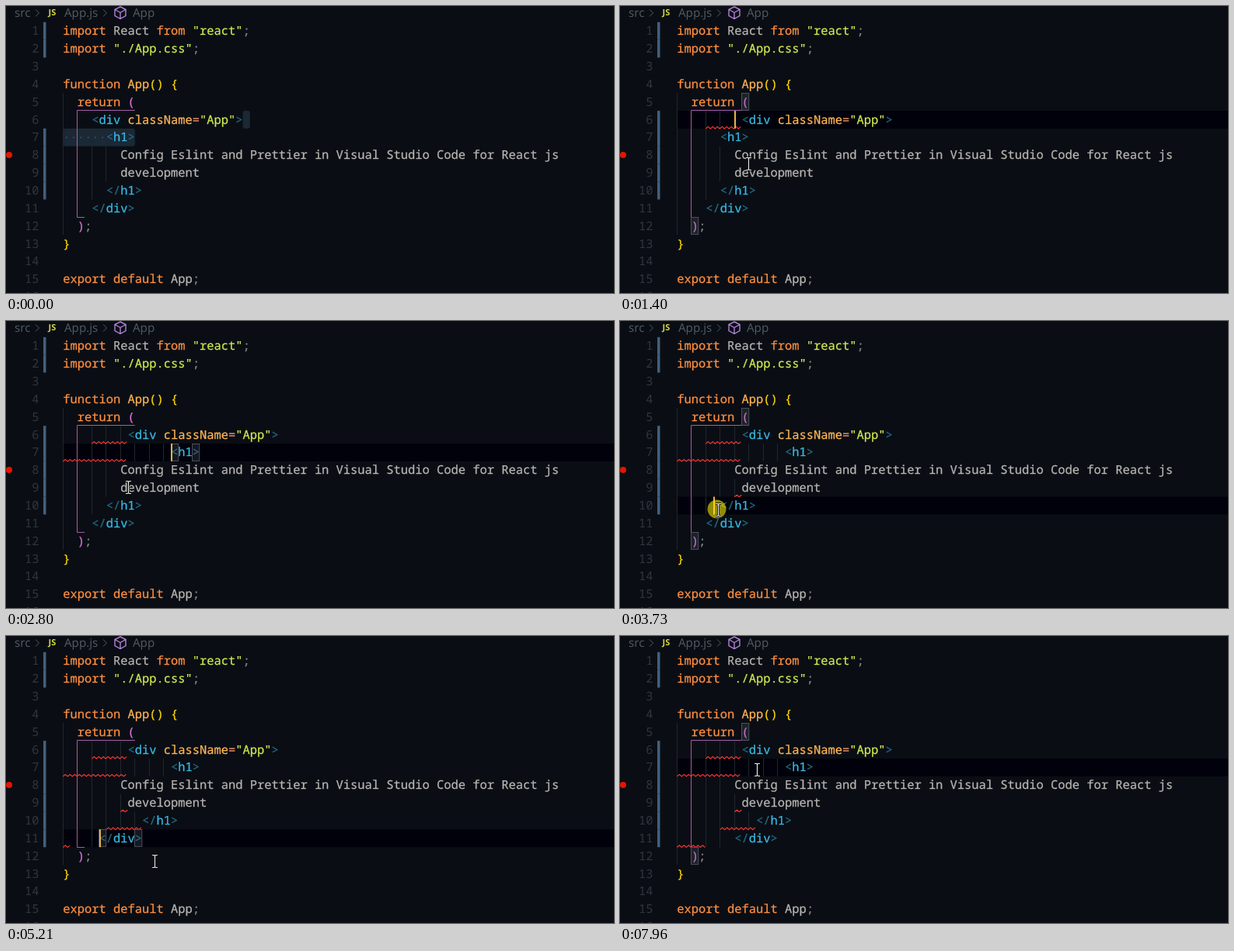
These frames come from a looping animation (782x370 px, 8000 ms). An HTML page:

```html
<!DOCTYPE html>
<html lang="en">
<head>
<meta charset="utf-8">
<title>Editor indentation</title>
<style>
html, body { margin: 0; width: 100%; height: 100%; overflow: hidden; background: #0a0e14; }
svg { display: block; width: 782px; height: 370px; }
text { white-space: pre; text-rendering: geometricPrecision; fill: currentColor; }
.code { font: 15.42px "Noto Sans Mono", monospace; color: #b8b6b2; }
.code tspan { fill: currentColor; stroke: currentColor; stroke-width: .25; }
.num { font: 15.42px "Noto Sans Mono", monospace; color: #2f363e; text-anchor: end; }
.crumb { font: 15.2px "Open Sans", sans-serif; color: #535b63; }
.js { font: bold 11px "Open Sans", sans-serif; color: #d3d345; }
.k { color: #ff8f40; }
.s { color: #d0ea50; }
.n { color: #ffb454; }
.t { color: #39bae6; }
.b { color: #246a85; }
.o { color: #f29668; }
.d { color: #858482; }
.y { color: #ffd700; }
.m { color: #da70d6; }
.line { fill: none; stroke-width: 1; }
</style>
</head>
<body>
<svg viewBox="0 0 782 370">
  <g id="back"></g>
  <g id="code"></g>
  <g id="front"></g>
  <g transform="translate(0 -.5)">
    <text class="crumb" x="11" y="14">src</text>
    <text class="js" x="54.5" y="12">JS</text>
    <text class="crumb" x="75" y="14">App.js</text>
    <text class="crumb" x="163" y="14">App</text>
    <path class="line" stroke="#535b63" d="M38 5l4.5 4.5L38 14M125 5l4.5 4.5L125 14"/>
    <path class="line" stroke="#b180d7" style="stroke-width:1.4" d="M147 1.5l7 3.5v8l-7 4-7-4V5zM140 5l7 4 7-4M147 9v8"/>
  </g>
  <circle cx="4" cy="192" r="4" fill="#e51400"/>
</svg>
<script>
const LOOP = 8000, TICK = 77, BLINK = 510;
const REPEAT_DELAY = 420, REPEAT_RATE = 33;
const LEFT = 73.3, TOP = 20.8, CW = 9.25, LH = 22.86;
const X = col => LEFT + col * CW;
const Y = row => TOP + (row - 1) * LH;
const byId = id => document.getElementById(id);

// Each row: indent, then class/text pairs.
const rows = [
  [0, 'k', 'import', 'f', ' React ', 'k', 'from ', 's', '"react"', 'd', ';'],
  [0, 'k', 'import ', 's', '"./App.css"', 'd', ';'],
  [0],
  [0, 'k', 'function ', 'n', 'App', 'y', '() {'],
  [2, 'k', 'return ', 'm', '('],
  [4, 'b', '<', 't', 'div ', 'n', 'className', 'o', '=', 's', '"App"', 'b', '>'],
  [6, 'b', '<', 't', 'h1', 'b', '>'],
  [8, 'f', 'Config Eslint and Prettier in Visual Studio Code for React js'],
  [8, 'f', 'development'],
  [6, 'b', '</', 't', 'h1', 'b', '>'],
  [4, 'b', '</', 't', 'div', 'b', '>'],
  [2, 'm', ')', 'd', ';'],
  [0, 'y', '}'],
  [0],
  [0, 'k', 'export default ', 'f', 'App', 'd', ';'],
  [0]
];
const textOf = row => rows[row - 1].slice(1).filter((_, i) => i % 2).join('');

// Click at a point, move aside to rest, then hold the space bar for n spaces.
const edits = [
  { press: 430, key: 840, at: [110, 148], rest: [167, 205], n: 5, warn: 4 },
  { press: 1600, key: 1820, at: [134, 171], rest: [171, 207], n: 9, warn: 0 },
  { press: 2860, key: 3180, at: [152, 217], rest: [172, 262], n: 1, warn: 8 },
  { press: 3650, key: 4040, at: [126, 243], rest: [178, 276], n: 5, warn: 6 },
  { press: 4820, key: 5059, at: [115, 262], rest: [191, 290], n: 4, warn: 0 },
  { press: 6380, key: 7470, at: [134, 160], rest: [176, 172], n: 0 }
];
for (const e of edits) {
  e.col = Math.floor((e.at[0] - LEFT) / CW);
  e.row = Math.floor((e.at[1] - TOP) / LH) + 1;
}

function typed(e, t) {
  if (t < e.key) return 0;
  const repeats = Math.floor((t - e.key - REPEAT_DELAY) / REPEAT_RATE) + 1;
  return Math.min(e.n, 1 + Math.max(0, repeats));
}

const indentOf = (row, t) =>
  edits.reduce((sum, e) => sum + (e.row === row ? typed(e, t) : 0), rows[row - 1][0]);

function lastAction(e, t) {
  const n = typed(e, t);
  if (!n) return e.press;
  return n === 1 ? e.key : e.key + REPEAT_DELAY + (n - 2) * REPEAT_RATE;
}

function pointerAt(t) {
  let pos = [230, 180];
  const glide = (to, start) => {
    const p = Math.min(1, Math.max(0, (t - start) / 250)), ease = p * p * (3 - 2 * p);
    pos = pos.map((v, i) => v + (to[i] - v) * ease);
  };
  for (const e of edits) {
    glide(e.at, e.press - 250);
    glide(e.rest, e.key - 150);
  }
  return pos.map(v => Math.round(v) + .5);
}

const rect = (x, y, w, h, fill, more = '') =>
  `<rect x="${x}" y="${y}" width="${w}" height="${h}" fill="${fill}" ${more}/>`;
const path = (d, stroke, w = 1) =>
  `<path class="line" d="${d}" stroke="${stroke}" style="stroke-width:${w}"/>`;
const bracketBox = (row, col) =>
  rect(Math.floor(X(col)) + .5, Math.round(Y(row)) + .5, CW, LH - 1, 'rgba(98,106,115,.22)', 'stroke="#4a525c"');

function squiggle(row, from, to) {
  const y = Y(row) + 21.8;
  let d = `M${X(from)} ${y + 1.3}`;
  for (let x = X(from) + 3, side = -1; x <= X(to) + .5; x += 3, side = -side) d += `L${x} ${y + side * 1.3}`;
  return path(d, '#f03434', 1.2);
}

function selection() {
  let out = rect(X(25), Y(6), CW, LH, '#1b2835', 'rx="3"') + rect(X(0), Y(7), CW * 10, LH, '#1b2835', 'rx="3"');
  for (let c = 0; c < 6; c++) out += `<circle cx="${X(c + .5)}" cy="${Y(7.5)}" r="1" fill="#46525f"/>`;
  return out;
}

function backdrop(t, edit) {
  let out = edit ? rect(LEFT, Y(edit.row), 709, LH, '#00010a') : selection();
  let guides = '';
  for (let r = 5; r <= 12; r++)
    for (let c = 0; c < indentOf(r, t); c += 2)
      if (c !== 2) guides += `M${Math.floor(X(c)) + .5} ${Y(r)}v${LH}`;
  out += path(guides, '#20272e') + path(`M${X(10)} 134.5H91.5V272.5H101`, '#a65ba8');
  const changed = [1, 2, 7, 8, 9, 10, ...edits.filter(e => typed(e, t)).map(e => e.row)];
  for (const r of new Set(changed)) out += rect(48, Y(r), 3.5, LH, '#435f7d');
  return out;
}

function caret(t, { row, col }, edit) {
  const c = col + typed(edit, t), text = textOf(row);
  const onTag = c === indentOf(row, t) && text[0] === '<';
  const boxes = onTag
    ? bracketBox(row, c) + bracketBox(row, c + text.indexOf('>'))
    : bracketBox(5, 9) + bracketBox(12, 2);
  const on = Math.floor((t - lastAction(edit, t)) / BLINK) % 2 === 0;
  return boxes + (on ? rect(Math.round(X(c)), Y(row), 2, LH, '#e6b450') : '');
}

function pointer(t, edit) {
  const [x, y] = pointerAt(t);
  const halo = edit && t - edit.press < 80
    ? `<circle cx="${x - 2}" cy="${y - 1}" r="12" fill="rgba(255,240,0,.58)"/>` : '';
  const beam = `M${x - 3.5} ${y - 8}h2.5l1 1 1-1h2.5M${x} ${y - 7}v14M${x - 3.5} ${y + 8}h2.5l1-1 1 1h2.5`;
  return halo + path(beam, '#000', 2.6) + path(beam, '#e8e8e8', 1.2);
}

function overlay(t, edit) {
  let out = '';
  for (const e of edits) {
    const n = typed(e, t);
    if (n && e.n) out += squiggle(e.row, e.warn, e.warn + n);
  }
  if (edit) out += caret(t, edit, edit);
  return t ? out + pointer(t, edit) : out;
}

byId('code').innerHTML = rows.map(([, ...parts], i) => {
  let spans = '';
  for (let j = 0; j < parts.length; j += 2)
    spans += `<tspan class="${parts[j]}">${parts[j + 1].replace(/</g, '&lt;')}</tspan>`;
  const y = Y(i + 1) + 16.5;
  return `<text class="num" x="42.5" y="${y}">${i + 1}</text><text class="code" id="row${i + 1}" y="${y}">${spans}</text>`;
}).join('');

let shown = -1;
function frame() {
  const now = performance.now() % LOOP, t = now - now % TICK;
  const tick = Math.round(t);
  if (tick !== shown) {
    shown = tick;
    const edit = edits.filter(e => e.press <= tick).pop();
    rows.forEach((_, i) => byId('row' + (i + 1)).setAttribute('x', X(indentOf(i + 1, tick))));
    byId('back').innerHTML = backdrop(tick, edit);
    byId('front').innerHTML = overlay(tick, edit);
  }
  requestAnimationFrame(frame);
}
frame();
</script>
</body>
</html>
```
